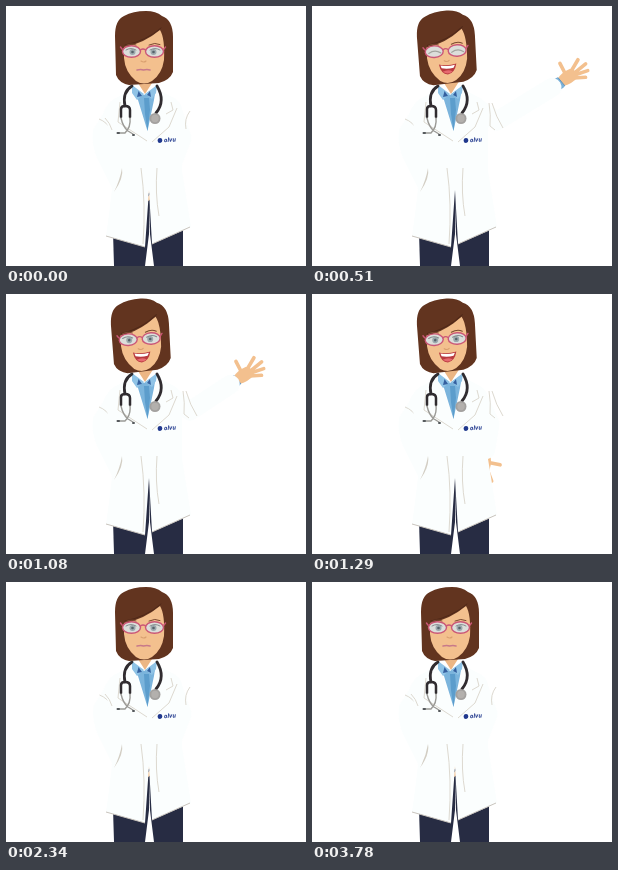
Recreate the animation shown at these times as an HTML page. Size 300x260 px, loop 3810 ms.

```html
<!DOCTYPE html>
<html lang="en">
<head>
<meta charset="utf-8">
<title>Waving doctor</title>
<style>
  html, body { margin: 0; width: 100%; height: 100%; overflow: hidden; background: #fff; }
  svg { display: block; width: 300px; height: 260px; }
  .coat { fill: #fbfefe; }
  .fold { fill: none; stroke: #ddd9d0; stroke-width: 1; }
  .line { fill: none; stroke-linecap: round; stroke-linejoin: round; }
</style>
</head>
<body>
<svg viewBox="0 0 300 260">
  <g fill="#272c43">
    <path d="M107 226L142 184H144L143 228L139 260H108Z"/>
    <path d="M143 184L144 228L148 260H177V222Z"/>
  </g>

  <g id="leftArm">
    <path class="coat" d="M112 92Q101 96 97 108L87 124Q85 139 92 154L106 182L120 170V95Z"/>
    <path class="fold" d="M93 113Q101 116 105 124"/>
  </g>

  <g id="hand">
    <path class="line" stroke="#f3c08e" stroke-width="3.6"
      d="M8 -3L9.5 -16M14 -3L26.5 -9M16 0L30.5 -1.2M16 2L28.5 5.5M13 4L23 9.8"/>
    <path fill="#f3c08e" d="M-1 -4.5Q6 -8 15 -6Q21 0 16 5.5Q9 8 -1 4.5Z"/>
    <path fill="#7bb2da" d="M-4 -6Q-1 -6.5 0 -5.5L1 5.5Q-1 6.5 -4 6Z"/>
    <path class="line" stroke="#5a8fbb" stroke-width=".8" d="M0 -5L1 5"/>
  </g>
  <path id="sleeve" class="line" stroke="#fbfefe" stroke-width="19"/>

  <path class="coat" d="M127 83L108 93Q99 98 101 116L108 164Q104 203 100 230L139 241L143 184
    L146 238L185 221Q180 189 176 165L176 125Q179 97 168 92L151 83L142 126Z"/>
  <path class="fold" d="M100 230L139 241M146 238L184 221" style="stroke:#c9c4bd"/>
  <path class="fold" d="M135 162Q140 198 137 238M151 162Q149 188 153 210"/>
  <path class="fold" d="M114 96L112 116L141 135M171 102L163 121L146 136M165 96L167 104L160 108"/>
  <path fill="#d3cec4" d="M116 162Q118 172 108 186Q114 174 116 162Z"/>
  <path id="restFolds" class="fold" d="M184 105Q178 113 180 123M99 112Q104 117 106 124"/>
  <path id="raisedFolds" class="fold" d="M180 97Q184 111 191 122M177 97Q179 109 178 120L183 124"/>

  <path fill="#7bb4dc" d="M127 82L138 89L150 81L148 94L141.500 125L132 94Z"/>
  <path fill="#5c9dcc" d="M138 92H143L144 104L141.500 125L139 108Z"/>
  <path fill="#ecb684" d="M130 74H148L139 88Z"/>
  <path fill="#8fc3e6" d="M126 79L138 88L131 94L126 87ZM151 79L139 88L146 93L150 87Z"/>
  <path fill="#34609f" d="M132.500 85L136 90L131 91ZM144 85L141 89L145 91Z"/>

  <g class="line">
    <path stroke="#302c30" stroke-width="2.8" d="M126 80Q116 86 119 100M151 80Q160 95 150 107"/>
    <path stroke="#302c30" stroke-width="2.5" d="M115 111V103Q115 100 119 100Q124 100 124 104V111"/>
    <path stroke="#9b9a96" stroke-width="1.4" d="M115 112Q117 121 122 125L127 128M124 112Q125 121 119 127L112 127"/>
    <path stroke="#55595c" stroke-width="2" d="M111.500 127H113M127 129H128"/>
  </g>
  <circle cx="149" cy="112.500" r="5.500" fill="#a3a19f"/>
  <circle cx="149" cy="112.500" r="3.700" fill="#b3b0ad"/>

  <g fill="#20388d" transform="rotate(-4 154 135)">
    <circle cx="154" cy="134.500" r="2.400"/>
    <text x="158" y="136.500" font-family="Open Sans, sans-serif" font-size="6" font-weight="700" font-style="italic">olvu</text>
  </g>

  <g id="head">
    <path fill="#62341f" d="M109 30Q109 14 118 10Q127 5 140 5Q150 5 156 10Q167 14 167 31L167 66Q164 74 153 77
      L123 79Q113 77 110 69Z"/>
    <path fill="#f3c08e" d="M118 41Q137 38 154 24Q159 32 158 54Q156 68 146 75Q138 80 130 75Q119 66 118 52Z"/>
    <path class="line" stroke="#4f2818" stroke-width="1" d="M119 39Q140 35 155 22"/>
    <path class="line" stroke="#7a4a31" stroke-width="1" d="M120 39.500Q124 37 130 39M143 39Q149 36 154 38.500"/>
    <path class="line" stroke="#d99f70" stroke-width="1.1" d="M135 55Q138 57 140 55"/>
    <g fill="#dcdeda" stroke="#cb5777" stroke-width="1.4">
      <ellipse cx="125.500" cy="45.500" rx="9" ry="5.800"/>
      <ellipse cx="148.500" cy="45.500" rx="9" ry="5.800"/>
      <path class="line" d="M134.500 44Q137 42 139.500 44M116 43L114.500 41M158 43L159.500 41"/>
    </g>
    <g id="openEyes">
      <g fill="#9ba8ad"><circle cx="126.500" cy="46" r="3"/><circle cx="147.500" cy="46" r="3"/></g>
      <g fill="#56626a"><circle cx="126.500" cy="46" r="1.300"/><circle cx="147.500" cy="46" r="1.300"/></g>
      <path class="line" stroke="#838b8e" d="M120 44Q125 41 130 44M144 44Q149 41 154 44"/>
    </g>
    <path id="closedEyes" class="line" stroke="#a3a59f" stroke-width="1.2" d="M120 47Q126 43 132 47M143 47Q149 43 155 47"/>
    <path id="calmMouth" class="line" stroke="#c8798a" stroke-width="1.500" d="M131 64Q135 63 137.500 64Q141 63 144 64"/>
    <g id="smile">
      <path fill="#b93a3f" d="M129.500 58.500Q138 61 147 58.500Q145 68 138 69Q131 68 129.500 58.500Z"/>
      <path fill="#fff" d="M131 59.500Q138 61.500 145.500 59.500L144 62.500Q138 64 132 62.500Z"/>
      <path fill="#e66a70" d="M133 66Q138 63.500 143 66Q138 70 133 66Z"/>
    </g>
  </g>
</svg>
<script>
const LOOP = 3810, STEP = 30;
const el = id => document.getElementById(id);
const clamp = v => Math.max(0, Math.min(1, v));
const ease = v => v * v * (3 - 2 * v);
const ramp = (t, from, to) => ease(clamp((t - from) / (to - from)));
const mix = (a, b, p) => a + (b - a) * p;
const show = (id, amount) => el(id).setAttribute('opacity', amount);

// time, wrist x, wrist y, hand angle, elbow x, elbow y
const wave = [
  [210, 161, 171, 120, 176, 132],
  [300, 186, 160, 65, 179, 126],
  [390, 230, 113, -5, 182, 118],
  [510, 249, 76, -34, 185, 115],
  [735, 226, 68, -54, 187, 120],
  [915, 245, 78, -34, 185, 116],
  [1080, 231, 86, -34, 184, 117],
  [1185, 205, 125, 15, 181, 123],
  [1290, 173, 160, 95, 178, 130],
  [1470, 161, 171, 120, 176, 132]
];

function armPose(t) {
  if (t <= wave[0][0]) return wave[0].slice(1);
  const next = wave.findIndex(key => key[0] > t);
  if (next < 0) return wave.at(-1).slice(1);
  const a = wave[next - 1], b = wave[next];
  const p = ramp(t, a[0], b[0]);
  return a.slice(1).map((v, i) => mix(v, b[i + 1], p));
}

function draw(now) {
  const t = Math.floor(now % LOOP / STEP) * STEP;
  const [x, y, angle, ex, ey] = armPose(t);
  el('hand').setAttribute('transform', `translate(${x} ${y}) rotate(${angle})`);
  el('sleeve').setAttribute('d', `M166 103L${ex} ${ey}L${mix(ex, x, .86)} ${mix(ey, y, .86)}`);

  const happy = ramp(t, 210, 390) * (1 - ramp(t, 1290, 1470));
  el('head').setAttribute('transform', `translate(${-1.5 * happy} ${-.5 * happy}) rotate(${-3 * happy} 138 80)`);
  el('smile').setAttribute('transform', `translate(138 60) scale(${mix(.7, 1, happy)} ${happy}) translate(-138 -60)`);
  show('smile', happy > .3 ? 1 : 0);
  show('calmMouth', happy > .3 ? 0 : 1);
  const closed = t >= 390 && t < 960;
  show('openEyes', closed ? 0 : 1);
  show('closedEyes', closed ? 1 : 0);
  show('raisedFolds', happy);
  show('restFolds', 1 - happy);

  const breath = t < 1620 ? 0 : (1 - Math.cos((t - 1620) / 540 * 2 * Math.PI)) / 2;
  el('leftArm').setAttribute('transform', `translate(${.7 * breath} 0)`);
  requestAnimationFrame(draw);
}
requestAnimationFrame(draw);
</script>
</body>
</html>
```
